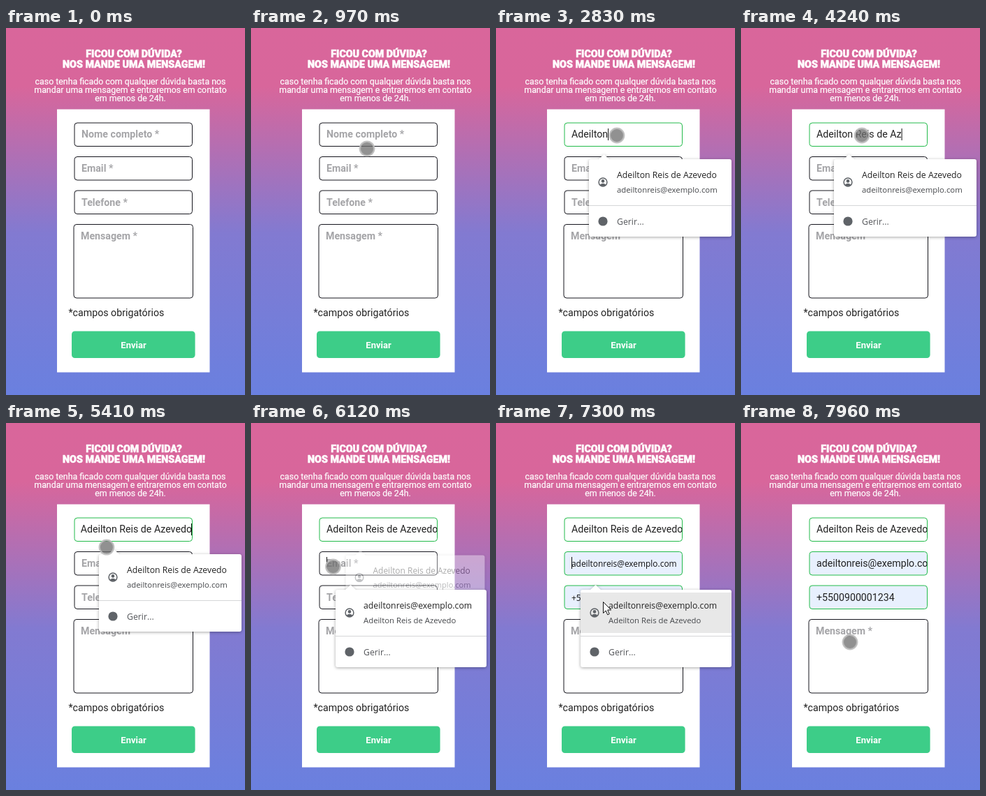
An HTML page for the animation above (8 s loop, 342 px wide and 526 px high).

```html
<!DOCTYPE html>
<html lang="pt">
<head>
<meta charset="utf-8">
<style>
  html, body { margin: 0; width: 100%; height: 100%; overflow: hidden; }
  body { background: linear-gradient(#d9669b, #d8669b 16%, #827ad1 56%, #6a80df); }
  svg { position: absolute; left: 0; top: 0; font: 14.2px Roboto, sans-serif; }
  text { white-space: pre; fill: #222; }
  .hint { font-weight: 700; fill: #a5a5a8; }
  .title { font-weight: 900; font-size: 14.25px; stroke: #fff; stroke-width: .5; }
  .intro { font-size: 12.35px; stroke: #fff; stroke-width: .2; }
  .send { font-weight: 700; font-size: 13px; }
  .title, .intro, .send { fill: #fff; text-anchor: middle; }
  .main, .sub, .preview { font-family: "Open Sans", sans-serif; }
  .main { font-size: 12.25px; }
  .sub { font-size: 11.35px; fill: #46484c; }
  .preview { font-size: 11.9px; fill: #111; }
  .popup { filter: drop-shadow(0 1px 2px rgba(0, 0, 0, .35)); }
</style>
</head>
<body>
<svg width="342" height="526" viewBox="0 0 342 526">
  <clipPath id="inner"><rect x="99" y="130" width="167.5" height="140"/></clipPath>
  <text class="title" x="183" y="42">FICOU COM DÚVIDA?</text>
  <text class="title" x="183" y="57">NOS MANDE UMA MENSAGEM!</text>
  <text class="intro" x="178" y="81">caso tenha ficado com qualquer dúvida basta nos</text>
  <text class="intro" x="178" y="93">mandar uma mensagem e entraremos em contato</text>
  <text class="intro" x="178" y="105">em menos de 24h.</text>
  <rect x="73" y="116.5" width="218.5" height="377" fill="#fff"/>
  <text x="89.5" y="413">*campos obrigatórios</text>
  <rect x="94" y="434.5" width="176.6" height="38.5" rx="4.5" fill="#3dcd88"/>
  <text class="send" x="182.5" y="459">Enviar</text>
  <g id="live"></g>
</svg>
<script>
const LOOP = 8000;
const NAME = 'Adeilton Reis de Azevedo';
const EMAIL = 'adeiltonreis@exemplo.com';
const PHONE = '+5500900001234';

// moment each letter of the name is typed
const KEYS = [1820, 1980, 2140, 2310, 2470, 2660, 2740, 2830, 2980, 3160,
  3320, 3410, 3500, 3590, 3690, 3780, 3870, 4130, 4235, 4340, 4490, 4600, 4780, 4830];

// pointer path: time, x, y
const PATH = [
  [20, 158, 253], [400, 161, 212], [730, 166, 179], [830, 166, 179], [970, 166, 173],
  [1200, 173, 154], [5170, 173, 154], [5410, 144, 178], [5650, 127, 194], [5900, 117.5, 206],
  [6390, 117.5, 206], [6750, 133, 235], [7170, 153, 256], [7340, 153, 256],
  [7600, 156, 290], [7940, 156, 314]
];

const EMAIL_FOCUS = 5900, HOVER = 6790, PICK = 7400;
const live = document.getElementById('live');
const ruler = document.createElement('canvas').getContext('2d');

const ramp = (t, a, b) => Math.min(1, Math.max(0, (t - a) / (b - a)));
const mix = (a, b, k) => `rgb(${a.map((v, i) => v + (b[i] - v) * k)})`;
const border = k => mix([22, 22, 30], [34, 187, 74], k);
const text = (x, y, str, cls = '') => `<text x="${x}" y="${y}" class="${cls}">${str}</text>`;
const caret = (x, y) => `<rect x="${x}" y="${y}" width="1" height="17" fill="#111"/>`;
const box = (x, y, w, h, stroke, fill = '#fff') =>
  `<rect x="${x + .5}" y="${y + .5}" width="${w - 1}" height="${h - 1}" rx="4" fill="${fill}" stroke="${stroke}"/>`;

function pointerAt(t) {
  const i = PATH.findIndex(p => p[0] > t);
  if (i < 0) return PATH.at(-1).slice(1);
  const [a, b] = [PATH[i - 1], PATH[i]], k = ramp(t, a[0], b[0]);
  return [a[1] + (b[1] - a[1]) * k, a[2] + (b[2] - a[2]) * k];
}

function popup(x, y, w, main, sub, alpha, scale, hover) {
  if (alpha <= 0) return '';
  const cx = x + w / 2, cy = y + 55;
  return `<g opacity="${alpha}" transform="translate(${cx} ${cy}) scale(${scale}) translate(${-cx} ${-cy})">
    <path class="popup" fill="#fff" d="M${x + 3} ${y}h11l7.5-7 7.5 7H${x + w - 3}q3 0 3 3v105q0 3-3 3H${x + 3}q-3 0-3-3v-105q0-3 3-3z"/>
    ${hover ? `<rect x="${x}" y="${y + 4}" width="${w}" height="58" fill="#e8e8e8"/>` : ''}
    <path d="M${x} ${y + 66.5}h${w}" stroke="#d5d6d8"/>
    <g transform="translate(${x + 20} ${y + 33})" fill="#5f6368">
      <circle r="5.9" fill="none" stroke="#5f6368" stroke-width="1.5"/>
      <circle cy="-1.6" r="2.3"/><path d="M-4.6 4q4.6-4.4 9.2 0Q0 8-4.6 4z"/>
    </g>
    <circle cx="${x + 20}" cy="${y + 89}" r="6.6" fill="#5f6368"/>
    ${text(x + 40, y + 27, main, 'main')}${text(x + 40, y + 48, sub, 'sub')}
    ${text(x + 40, y + 93.5, 'Gerir...', 'main" style="fill:#55575b')}</g>`;
}

function nameField(t) {
  const typed = NAME.slice(0, KEYS.filter(k => k <= t).length);
  const focus = t >= 1200 && t < EMAIL_FOCUS;
  ruler.font = '14.2px Roboto, sans-serif';
  const end = 108 + ruler.measureText(typed).width;
  const shift = focus ? Math.min(0, 266 - end) : 0;
  return box(97.5, 135.5, 169.5, 34.5, border(ramp(t, 1820, 2050))) +
    (typed ? text(108 + shift, 157, typed, '" clip-path="url(#inner)') : text(108, 157, 'Nome completo *', 'hint')) +
    (focus ? caret(Math.min(265, end), 144) : '');
}

function filledField(t, y, hint, value) {
  const on = t >= HOVER;
  const content = on
    ? text(108, y + 22, value, (t < PICK ? 'preview' : '') + '" clip-path="url(#inner)')
    : text(108, y + 22, hint, 'hint');
  return box(97.5, y, 169.5, 34.5, border(ramp(t, HOVER, HOVER + 200)), on ? '#e8f0fe' : '#fff') + content;
}

function pointer(t) {
  if (t < 20) return '';
  const [x, y] = pointerAt(t);
  if (t >= HOVER && t < 7480)
    return `<path transform="translate(${x} ${y})" d="M.5.5v16l3.7-3.5 2.5 5.8 2.5-1.1-2.5-5.7h5z" fill="#fff" stroke="#111"/>`;
  return `<circle cx="${x}" cy="${y}" r="10.2" fill="#6e6e6e" fill-opacity=".76" stroke="#bcbcbc" stroke-opacity=".85" stroke-width="2.5"/>`;
}

function render(t) {
  const open = ramp(t, 1260, 1440), leaving = t >= EMAIL_FOCUS;
  const first = leaving ? .38 * (1 - ramp(t, 6120, 6240)) : open;
  const second = t < 6110 ? 0 : 1 - ramp(t, PICK, 7540);
  live.innerHTML =
    nameField(t) +
    filledField(t, 184, 'Email *', EMAIL) +
    filledField(t, 232.5, 'Telefone *', PHONE) +
    box(96.5, 281, 171.5, 106.5, border(0)) + text(107, 303, 'Mensagem *', 'hint') +
    (leaving && t < PICK ? caret(108, 192) : '') +
    popup(133, 188, 204, NAME, EMAIL, first, leaving ? .975 : .97 + .03 * open) +
    popup(121, 239, 216, EMAIL, NAME, second, 1 - .03 * ramp(t, PICK, 7540), t >= HOVER) +
    pointer(t);
}

function tick() {
  render(performance.now() % LOOP);
  requestAnimationFrame(tick);
}
tick();
</script>
</body>
</html>
```
